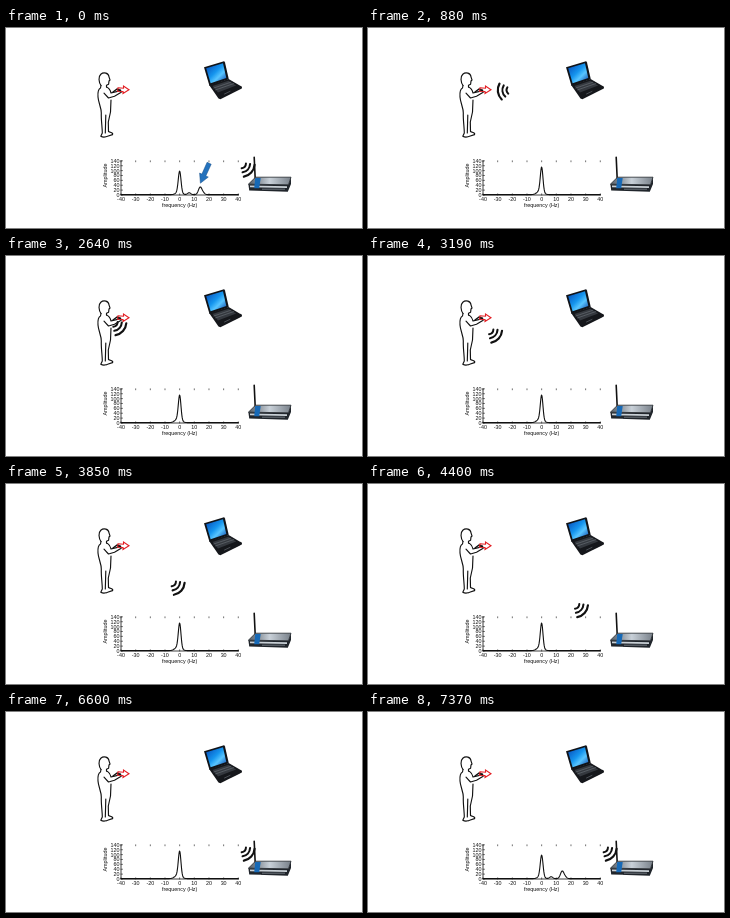
An HTML page that plays this animation: 356 px wide and 200 px high, repeating every 8000 ms.

```html
<!DOCTYPE html>
<html lang="en">
<head>
<meta charset="utf-8">
<title>Reflected signal</title>
<style>
html, body { margin: 0; width: 100%; height: 100%; overflow: hidden; background: #fff; }
svg { display: block; width: 100vw; height: 100vh; }
text { font-family: "Liberation Sans", Arial, sans-serif; font-size: 5.4px; fill: #111; }
.line { fill: none; stroke: #111; stroke-linecap: round; stroke-linejoin: round; }
</style>
</head>
<body>
<svg viewBox="0 0 356 200">
  <defs>
    <linearGradient id="screen" x1="0" y1="0" x2="1" y2="1">
      <stop offset="0" stop-color="#0645b4"/>
      <stop offset=".45" stop-color="#1595ee"/>
      <stop offset=".65" stop-color="#58c5ff"/>
      <stop offset="1" stop-color="#0639a0"/>
    </linearGradient>
    <linearGradient id="metal" x2="1">
      <stop offset="0" stop-color="#555d66"/>
      <stop offset=".5" stop-color="#c8d0d8"/>
      <stop offset="1" stop-color="#788089"/>
    </linearGradient>
    <g id="wave" class="line">
      <path d="M-4.7-3.2A5 5 0 0 1-4.7 3.2" stroke-width="2"/>
      <path d="M-1.3-5.6A9 9 0 0 1-1.3 5.6" stroke-width="2.1"/>
      <path d="M2.6-8A13 13 0 0 1 2.6 8" stroke-width="2.2"/>
    </g>
  </defs>

  <!-- person -->
  <g class="line" stroke-width="1.15">
    <path d="M95 57.5C92.6 54 92.2 48.5 94.8 46.2C97.8 43.7 102.6 45 103 48.8L104 52L103 53L102.6 56.2L100.5 57.2V59"/>
    <path d="M95 57.5L94.5 60C91.8 61.2 91.7 65 92 69C92.4 75 95.5 80 95.3 85C95 92 96.3 99 96.3 105L94.8 108.2C97 109.6 100.5 108.8 102.3 108L106.5 106.6C107.6 105 104.8 104.6 102.5 103.4L102.3 94L104.5 84L105 72"/>
    <path d="M100.5 59C103.2 60 104.2 61.7 105 65L110.5 63.6L114.5 62L115.2 64.3L108.5 68.2L102.5 70L98 65.2M99.8 87L99.3 105"/>
    <path d="M107 64L111 61L114 62.2" stroke-width="1.5"/>
  </g>
  <path d="M112 59.8L117.5 60.2V58L123 61.8L117 65.5V63.5L111.6 63.2Z" fill="none" stroke="#e21d22" stroke-width="1.1"/>

  <!-- laptop -->
  <path d="M198 39.2L217.2 33.4Q218.6 33.1 219 34.4L222.8 51.2L203.5 58Z" fill="#101318"/>
  <path d="M200.2 40.2L217 35.3L220.3 50L204.6 55.3Z" fill="url(#screen)"/>
  <path d="M203.3 57.3L222.6 51L236 58.8L235.8 60.5L214.4 71.2L212.5 70.5Z" fill="#15171b"/>
  <path d="M206.5 58.1L222.4 52.8L230.2 57.4L212 64.6Z" fill="#34383e"/>
  <path d="M207.8 60L225 54.2M209.6 61.9L227.6 55.6M218.5 66L224 63.4" class="line" style="stroke:#6e747b" stroke-width=".6"/>

  <!-- router -->
  <path d="M248.2 129.2L249.2 151" class="line" stroke-width="1.6"/>
  <path d="M242.4 156.2L249.5 149.2H285L282.5 156.8Z" fill="url(#metal)" stroke="#23282d" stroke-width=".8"/>
  <path d="M242.4 156.2L282.5 156.8L285 149.5V156L281.8 163.8L243.2 162.4Z" fill="#20252b"/>
  <path d="M244 157.5L281 158.2V160L244 159.2Z" fill="#c9d0d6"/>
  <path d="M249.2 150H254.7L253.2 160.2H248.2Z" fill="#1769b6"/>
  <path d="M256 161.2H279" stroke="#8d959c" stroke-width=".7"/>

  <g id="plot">
    <path d="M115 132.8V167H232.3" class="line" stroke-width=".8"/>
    <text transform="translate(100.6 159.5) rotate(-90)">Amplitude</text>
    <text x="173.7" y="179" text-anchor="middle">frequency (Hz)</text>
  </g>
  <path id="curve" class="line" stroke-width="1.1"/>
  <path id="arrow" d="M201.1 134.3L205.2 136.2L199.8 148L202.3 149.1L194.4 155.2L193.6 145.1L195.9 146.1Z" fill="#2472bd" stroke="#174f88" stroke-width=".5"/>
  <use id="inbound" href="#wave"/>
  <use id="outbound" href="#wave"/>
</svg>
<script>
const $ = id => document.getElementById(id);
const px = hz => 173.65 + hz * 1.466;
const py = amp => 167 - amp * 0.244;

function label(x, y, value, anchor) {
  return `<text x="${x}" y="${y}" text-anchor="${anchor}">${value}</text>`;
}

let axes = '', ticks = '';
for (let amp = 0; amp <= 140; amp += 20) {
  axes += label(113.6, py(amp) + 1.9, amp, 'end');
  ticks += `M115 ${py(amp)}h1.5`;
}
for (let hz = -40; hz <= 40; hz += 10) {
  axes += label(px(hz), 172.8, hz, 'middle');
  ticks += `M${px(hz)} 167v-1.2M${px(hz)} 132.8v1`;
}
$('plot').insertAdjacentHTML('beforeend', axes + `<path d="${ticks}" class="line" stroke-width=".6"/>`);

// Each peak is [centre, height, width].
function curve(peaks) {
  let d = '';
  for (let hz = -40; hz <= 40; hz += 0.25) {
    const amp = peaks.reduce((sum, [c, h, w]) => sum + h * Math.exp(-(((hz - c) / w) ** 2)), 1.5);
    d += `${d ? 'L' : 'M'}${px(hz).toFixed(2)} ${py(amp).toFixed(2)}`;
  }
  return d;
}
const still = curve([[0, 98, 1.25], [-1, 17, 2.8]]);
const shifted = curve([[0, 86, 1.3], [-0.6, 11, 2.6], [6.5, 8, 1.5], [14, 30, 1.7], [16, 6, 1.6]]);

function ease(t, start, length) {
  const u = Math.min(1, Math.max(0, (t - start) / length));
  return (1 - Math.cos(Math.PI * u)) / 2;
}

function show(id, on) {
  $(id).setAttribute('visibility', on ? 'visible' : 'hidden');
}

function move(id, from, to, p, angle) {
  const [x, y] = from.map((v, i) => v + (to[i] - v) * p);
  $(id).setAttribute('transform', `translate(${x} ${y}) rotate(${angle})`);
}

function draw(now) {
  const t = now % 8000;
  show('arrow', t < 110);
  show('inbound', t >= 110 && t < 1870);
  show('outbound', t < 110 || t >= 1870);
  move('inbound', [190, 56], [113.5, 66], ease(t, 110, 1200), 172);
  move('outbound', [113, 71.5], [241.3, 141], t < 110 ? 1 : ease(t, 2650, 2550), 42);
  $('curve').setAttribute('d', t < 110 || t >= 7260 ? shifted : still);
}

const begin = performance.now();
function frame() {
  draw(performance.now() - begin);
  requestAnimationFrame(frame);
}
frame();
</script>
</body>
</html>
```
